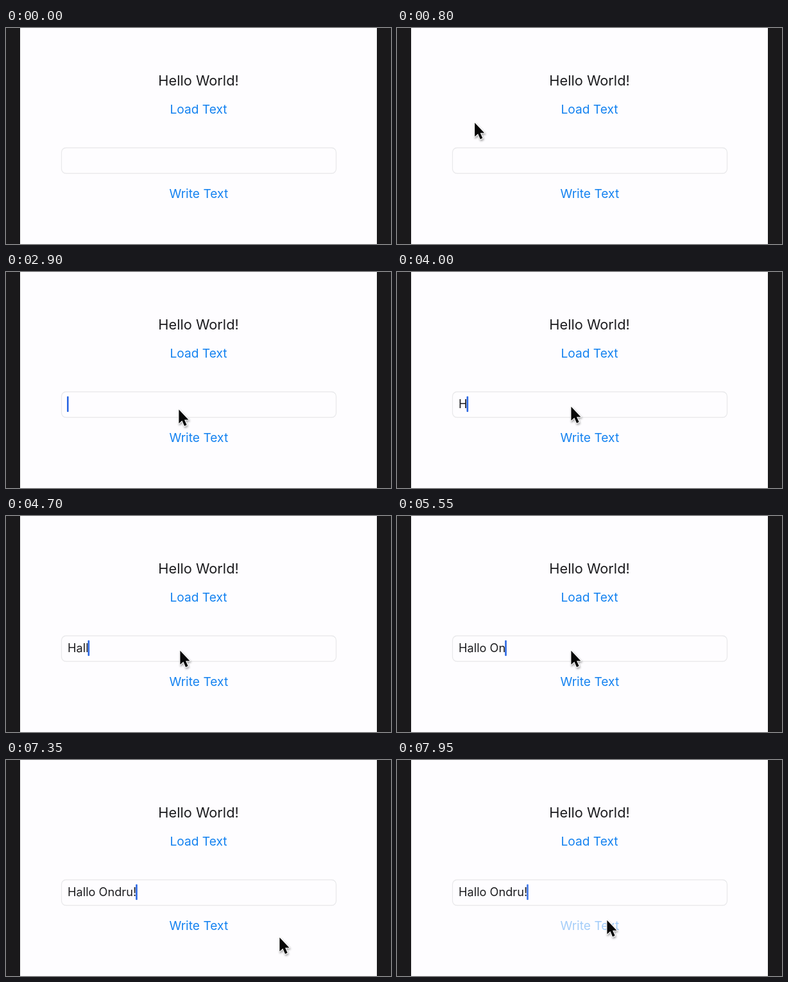
Write an HTML page that moves like this. It is 600x338 px and loops after 8 s.

```html
<!DOCTYPE html>
<html lang="en">
<head>
<meta charset="utf-8">
<title>Text field demo</title>
<style>
  html, body { margin: 0; width: 100%; height: 100%; overflow: hidden; background: #fefdff; }
  svg { display: block; width: 600px; height: 338px; }
  text { font-family: Inter, Roboto, sans-serif; font-size: 19.2px; fill: #1c1c1f; white-space: pre; }
  .centered { text-anchor: middle; }
  .title { font-size: 21.8px; }
  .button { fill: #1482f0; }
  #typed { font-size: 18.2px; }
  #scene { filter: blur(.55px); }
  #pointer { filter: drop-shadow(1px 2px 1.5px rgba(0, 0, 0, .35)); }
</style>
</head>
<body>
<svg viewBox="0 0 600 338">
  <g id="scene">
    <rect x="-5" y="-5" width="610" height="348" fill="#1a191b"/>
    <rect x="22" y="-5" width="556" height="348" fill="#fefdff"/>
    <text class="centered title" x="300" y="90.2">Hello World!</text>
    <text class="centered button" x="300" y="134.2">Load Text</text>
    <rect x="86.5" y="187.5" width="428" height="40" rx="7" fill="#fefdff" stroke="#e9e9eb" stroke-width="1.3"/>
    <text id="typed" x="96" y="213.3"></text>
    <rect id="caret" y="194.5" width="2.6" height="24.5" rx="1" fill="#2a66e2"/>
    <text id="write" class="centered button" x="300.3" y="266">Write Text</text>
    <g id="pointer">
      <path d="M0 0V23L5.3 18.2L9.2 27.3L13 25.6L9.2 16.9H16Z" transform="translate(-.6 .8) scale(.94)"
            fill="#080808" stroke="#fff" stroke-width="2.4" stroke-linejoin="round" paint-order="stroke"/>
    </g>
  </g>
</svg>
<script>
  const DURATION = 8000, STEP = 50;
  const POINTER_IN = 500, FOCUS = 2900, CARET_IDLE = 3450, PRESS = 7900;
  const MESSAGE = 'Hallo Ondru!';
  const TYPING_START = 3950, KEY_INTERVAL = 204;
  const BLINK_START = 6500, BLINK_PERIOD = 850;
  const ENTRY = [-22, 119];
  const MOVES = [
    { start: 450, end: 1150, to: [265.5, 176] },
    { start: 1250, end: 1500, to: [268, 219] },
    { start: 2850, end: 2950, to: [272, 210] },
    { start: 6450, end: 7150, to: [427, 277] },
    { start: 7350, end: 7850, to: [328, 250] }
  ];

  const [typed, caret, write, pointer] =
    ['typed', 'caret', 'write', 'pointer'].map(id => document.getElementById(id));

  const clamp = (v, min, max) => Math.min(max, Math.max(min, v));
  const progress = (t, from, to) => clamp((t - from) / (to - from), 0, 1);
  const smooth = p => p * p * (3 - 2 * p);

  const pointerAt = t => MOVES.reduce((position, { start, end, to }) => {
    const p = smooth(progress(t, start, end));
    return position.map((v, axis) => v + (to[axis] - v) * p);
  }, ENTRY);

  function caretOpacity(t) {
    if (t < FOCUS) return 0;
    if (t < TYPING_START) return 1 - progress(t, CARET_IDLE, CARET_IDLE + 300);
    if (t < BLINK_START) return 1;
    const phase = (t - BLINK_START) % BLINK_PERIOD;
    return 1 - progress(phase, 0, 200) + progress(phase, 400, 620);
  }

  function render(t) {
    const keys = Math.floor((t - TYPING_START) / KEY_INTERVAL) + 1;
    typed.textContent = MESSAGE.slice(0, clamp(keys, 0, MESSAGE.length));
    const width = typed.textContent ? typed.getComputedTextLength() : 0;
    caret.setAttribute('x', 95 + width);
    caret.setAttribute('opacity', caretOpacity(t));
    write.setAttribute('opacity', t >= PRESS ? 0.38 : 1);
    pointer.setAttribute('visibility', t >= POINTER_IN ? 'visible' : 'hidden');
    pointer.setAttribute('transform', `translate(${pointerAt(t)})`);
  }

  function tick() {
    render(Math.floor(performance.now() % DURATION / STEP) * STEP);
    requestAnimationFrame(tick);
  }
  tick();
</script>
</body>
</html>
```
